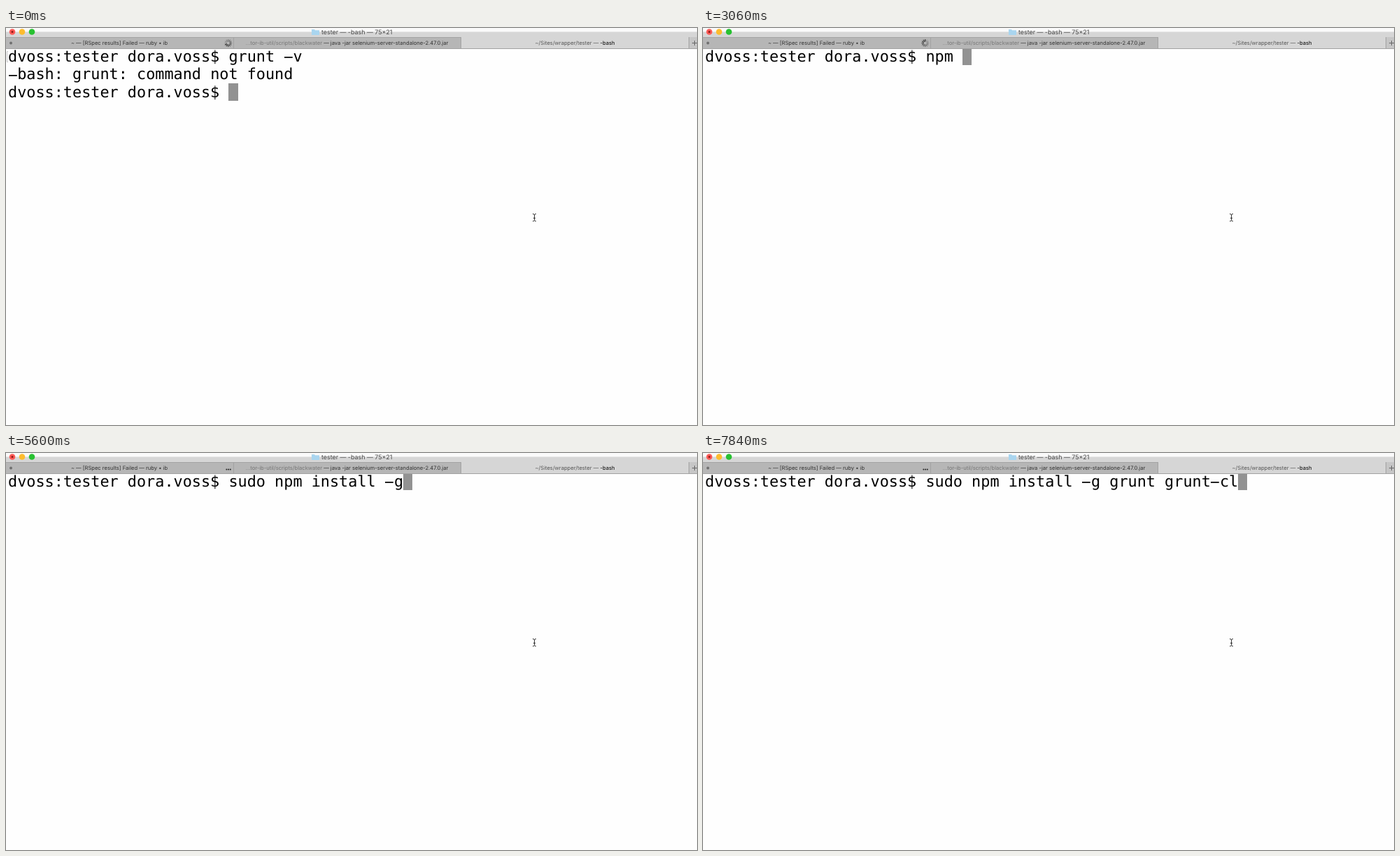
Animation, 988 px wide and 567 px high, one loop 7990 ms. Source, as an HTML page:

```html
<!DOCTYPE html>
<html lang="en">
<head>
<meta charset="utf-8">
<title>Terminal session</title>
<style>
  html, body { margin: 0; width: 100%; height: 100%; overflow: hidden; background: #fefefe; }
  #stage { position: relative; width: 988px; height: 567px; overflow: hidden; }
  #term {
    position: absolute; left: 3px; top: 28.8px; margin: 0; color: #000;
    font: 21.84px/25.6px "DejaVu Sans Mono", monospace;
    text-rendering: geometricPrecision; font-variant-ligatures: none;
  }
  #term i {
    font-style: normal; color: transparent;
    background: linear-gradient(#000, #000) .03em .58em / .54em .08em no-repeat;
  }
  #term b { position: relative; top: -1px; padding-bottom: .5px; background: #929292; }
  svg { position: absolute; left: 0; top: 0; }
  svg text {
    font: 7.6px Inter, "Open Sans", sans-serif; fill: #333;
    text-anchor: middle; text-rendering: geometricPrecision;
  }
  svg .title { font-size: 8.9px; fill: #444; text-anchor: start; }
  .dim { fill: #777; }
  .path { fill: #555; }
</style>
</head>
<body>
<div id="stage">
  <pre id="term"></pre>
  <svg width="988" height="567" viewBox="0 0 988 567">
    <!-- title bar -->
    <rect width="988" height="13" fill="#d6d6d6"/>
    <rect width="988" height="5.5" fill="#fafafa"/>
    <circle cx="9" cy="5.5" r="4.3" fill="#fc5b57"/>
    <circle cx="9" cy="5.5" r="1.5" fill="#8c1a15"/>
    <circle cx="23" cy="5.5" r="4.3" fill="#fdbc2e"/>
    <circle cx="37" cy="5.5" r="4.3" fill="#28c131"/>
    <path d="M437 2h4l1 1.2h6V10H437z" fill="#a9d5ef"/>
    <text class="title" x="451" y="9">tester — -bash — 75×21</text>

    <!-- tabs -->
    <rect y="13" width="651" height="17" fill="#b6b6b6"/>
    <rect x="651" y="13" width="326" height="17" fill="#d6d6d6"/>
    <rect x="977" y="13" width="11" height="17" fill="#c6c6c6"/>
    <path d="M0 13.5H651M325.5 13V29M650.5 13V29M976.5 13V29M0 29.5H988" stroke="#a2a2a2" fill="none"/>
    <circle cx="7" cy="21.5" r="2" fill="#707070"/>
    <text x="162" y="24.3">~ — [RSpec results] Failed — ruby • ib</text>
    <text x="487.5" y="24.3"><tspan class="dim">…tor-ib-util/scripts/blackwater</tspan> — java -jar selenium-server-standalone-2.47.0.jar</text>
    <text x="813.5" y="24.3"><tspan class="path">~/Sites/wrapper/tester —</tspan> <tspan fill="#000">-bash</tspan></text>
    <path d="M981 21.5h7M984.5 18v7" stroke="#666" fill="none"/>

    <g id="spinner" stroke="#222" stroke-width="1.1" stroke-linecap="round"></g>
    <g id="dots" fill="#222">
      <circle cx="315.4" cy="23.6" r="1"/><circle cx="318.1" cy="23.6" r="1"/><circle cx="320.8" cy="23.6" r="1"/>
    </g>

    <path id="mark" d="M3 33.5H1.5V48.5H3" stroke="#c4c4c4" fill="none"/>

    <!-- mouse pointer -->
    <path d="M753 265.5q2.5 0 2.5 1.5q0-1.5 2.5-1.5M755.5 267v7.5M753 276q2.5 0 2.5-1.5q0 1.5 2.5 1.5M754 271.5h3"
      stroke="#333" fill="none"/>
  </svg>
</div>
<script>
  const LOOP = 7990, CLEARED = 1860, IDLE = 3810;
  const PROMPT = 'dvoss:tester dora.voss$ ';
  const HISTORY = PROMPT + 'grunt -v\n-bash: grunt: command not found\n';
  const COMMAND = 'sudo npm install -g grunt grunt-cl';

  // [time, text, characters shown]
  const keys = [
    [0, '', 0],
    [1410, 'clear', 1], [1560, 'clear', 3], [1710, 'clear', 5], [CLEARED, '', 0],
    [2610, 'npm i', 1], [2760, 'npm i', 2], [2910, 'npm i', 3], [3060, 'npm i', 4], [3210, 'npm i', 5],
    [3360, 'npm i', 3], [3510, '', 0],
    ...[
      [3660, 1], [3810, 2], [3960, 4], [4110, 5], [4260, 6], [4400, 7],
      [4550, 8], [4700, 9], [4850, 11], [5000, 12], [5150, 14], [5300, 16], [5450, 17],
      [5600, 19], [5750, 20], [5900, 21], [6050, 22], [6200, 24], [6340, 25]
    ].map(([t, n]) => [t, COMMAND, n]),
    ...Array.from({ length: 7 }, (_, i) => [6640 + 150 * i, COMMAND, 26 + i]),
    [7840, COMMAND, 34]
  ];

  const el = id => document.getElementById(id);
  const show = (id, on) => el(id).setAttribute('visibility', on ? 'visible' : 'hidden');

  el('spinner').innerHTML = Array.from({ length: 12 }, (_, i) =>
    `<path d="M0-2.6V-5" transform="rotate(${i * 30})" opacity="${(0.25 + 0.75 * i / 11).toFixed(2)}"/>`
  ).join('');

  let shown = '';
  function draw(t) {
    const [, text, count] = keys.findLast(k => k[0] <= t);
    const lines = (t < CLEARED ? HISTORY : '') + PROMPT + text.slice(0, count);
    if (lines !== shown) {
      shown = lines;
      el('term').innerHTML = lines.replace(/-/g, '<i>-</i>') + '<b> </b>';
    }
    show('mark', t < CLEARED);
    show('spinner', t < IDLE);
    show('dots', t >= IDLE);
    const angle = 270 + 60 * Math.floor(t / 150);
    el('spinner').setAttribute('transform', `translate(317.7 21.5) rotate(${angle})`);
  }

  const start = performance.now();
  function tick() {
    draw((performance.now() - start) % LOOP);
    requestAnimationFrame(tick);
  }
  tick();
</script>
</body>
</html>
```
